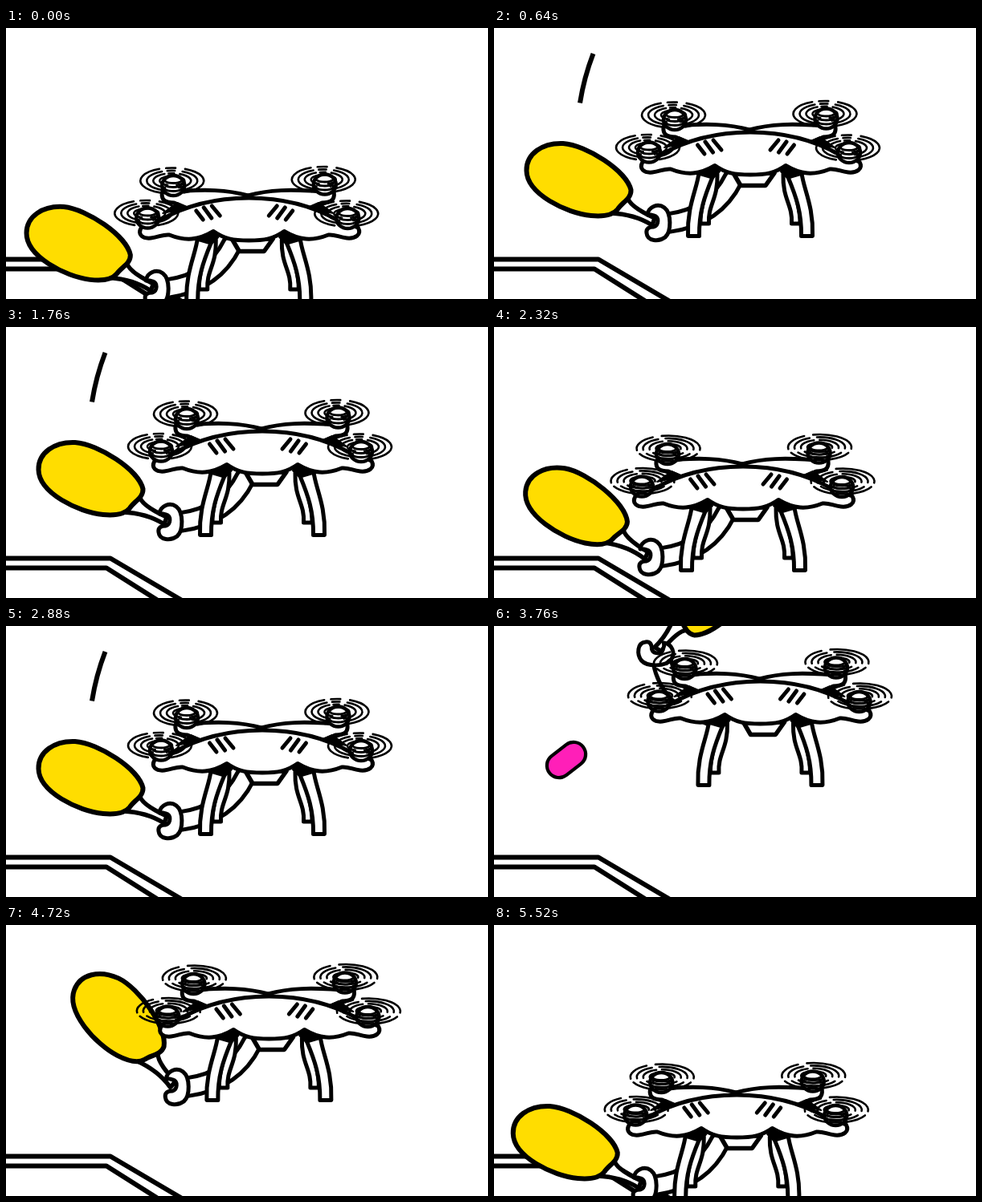
An HTML page with a canvas for the animation above (5600 ms loop, 600 px wide and 338 px high).

```html
<!DOCTYPE html>
<html lang="en">
<head>
<meta charset="utf-8">
<style>
html, body { margin: 0; width: 100%; height: 100%; overflow: hidden; background: #fff; }
canvas { display: block; }
</style>
</head>
<body>
<canvas id="stage" width="600" height="338"></canvas>
<script>
const ctx = document.getElementById('stage').getContext('2d');
const STEP = 80, STEPS = 14;
const YELLOW = '#ffdd00', PINK = '#ff1fb8';

// One pose per step of the swing
const LIFT = [0, 38, 95, 123, 138, 143, 155, 167, 82, 46, 17, 5, 0, 0];
const ANGLE = [1.5, 6, 14, 22, 68, 104, 115, 78, 0, 0, 0, 0, 0, 0];
const RAISE = [0, 0, 0, 0, .5, 1, 1.05, .9, 0, 0, 0, 0, 0, 0];
const BALL = { 4: [-2, 240], 5: [90, 167], 6: [158, 115], 7: [192, 85] };

const shape = d => new Path2D(d);
const TABLE = shape('M-5 288.5H130L219 341M-5 300.5H125L189 341');
const SWOOSH = shape('M123.5 32Q112 62 107 93.5');
const BLADE = shape('M40.5 178C40 157 60 143 86 144C115 146 165 178 170.5 202C171 213 160 217 154 226C147 235 132 235 121 234C90 231 41 207 40.5 178Z');
const HANDLE = shape('M166 210Q167 222 200 237L197 246Q175 232 145 231');
const FIST = shape('M191 233C192 223 204 218 212 224C221 231 221 254 213 261C205 267 191 266 190 256C189 250 193 248 199 248C205 246 206 236 199 234Q195 232 191 233Z');
const BACK_LEG = shape('M262 185C268 205 256 220 257 244H267.5C266 220 279 214 278 182Z');
const FRONT_LEG = shape('M255 181C253 200 240 222 241.5 259.5H255.5C255 230 262 210 272 186Z');
const HIP = shape('M257 180L275 171L281 179L272 188L266 182Z');
const BACK_ARM = shape('M318 127C290 119 262 120 240 121L211 123C210 132 214 136 226 136L244 144');
const WEDGE = shape('M212 149L230 136L244 142Z');
const BODY = shape('M319 130C284 130 246 136 208 158L185 167C180 176 187 181 197 180C207 179 212 175 220 176C240 184 256 183 275 171.5C288 181 300 183 319 183' +
  'C338 183 350 181 363 171.5C382 183 398 184 418 176C426 175 431 179 441 180C451 181 460 176 455 167L430 158C392 136 354 130 319 130Z');
const CAMERA = shape('M298 181L307 196.5H338L349 181Z');
const SLASHES = shape('M253.5 146L262 157M263 142L272.5 155M273 140L283 152');

function draw(path, width, fill) {
  if (fill) { ctx.fillStyle = fill; ctx.fill(path); }
  ctx.strokeStyle = '#000';
  ctx.lineWidth = width;
  ctx.stroke(path);
}

function mirrored(sum, paint) {
  paint();
  ctx.save();
  ctx.translate(sum, 0);
  ctx.scale(-1, 1);
  paint();
  ctx.restore();
}

function tube(path, outer, inner, color) {
  draw(path, outer);
  ctx.strokeStyle = color;
  ctx.lineWidth = inner;
  ctx.stroke(path);
}

function arc(x, y, rx, ry, from, to) {
  ctx.beginPath();
  ctx.ellipse(x, y, rx, ry, 0, from, to);
  ctx.stroke();
}

function rotor(x, y, odd) {
  const hub = new Path2D();
  hub.ellipse(x + 1.5, y + 6, 14, 12.5, 0, 0, Math.PI * 2);
  draw(hub, 4.5, '#fff');
  ctx.lineWidth = 2.8;
  for (let i = 0; i < 3; i++) arc(x + 1.5, y + i * 5 - 1, 11, 4, .2, 2.9);
  ctx.lineWidth = 2.6;
  for (let i = 0; i < 4; i++) {
    const rx = 39.5 - i * 8, ry = 16 - i * 3.4;
    if (odd) {
      const a = .45 + i * .12;
      arc(x + 2.5, y - 1, rx, ry, a, 2.7 - i * .1);
      arc(x + 2.5, y - 1, rx, ry, 3.0, 4.2 + i * .1);
      arc(x + 2.5, y - 1, rx, ry, 4.5 + i * .1, 6.4);
    } else {
      arc(x, y, rx, ry, 1.95, 4.3);
      arc(x, y, rx, ry, -1.15, 1.2);
      arc(x, y, rx, ry, 4.52, 4.82);
    }
  }
}

function racketArm(angle, raise) {
  const mix = (a, b) => a + (b - a) * raise;
  const hx = mix(203, 189), hy = mix(243, 94);
  const arm = new Path2D();
  arm.moveTo(mix(298, 262), mix(188, 175));
  arm.quadraticCurveTo(mix(275, 205), mix(235, 150), hx + mix(15, 8), hy + mix(0, 12));
  tube(arm, 27.5, 17.5, '#fff');

  const turned = (degrees, paint) => {
    ctx.save();
    ctx.translate(hx, hy);
    ctx.rotate(degrees * Math.PI / 180);
    ctx.translate(-203, -243);
    paint();
    ctx.restore();
  };
  turned(angle, () => {
    draw(HANDLE, 5.5, '#fff');
    draw(BLADE, 6, YELLOW);
  });
  turned(raise * 90, () => draw(FIST, 5, '#fff'));
}

function drone(odd) {
  mirrored(638, () => {
    draw(BACK_LEG, 5, '#fff');
    draw(FRONT_LEG, 5, '#fff');
  });
  mirrored(636, () => {
    draw(BACK_ARM, 5, '#fff');
    draw(WEDGE, 2, '#000');
  });
  draw(CAMERA, 5.5, '#fff');
  draw(BODY, 5, '#fff');
  mirrored(638, () => draw(HIP, 2, '#000'));
  mirrored(627, () => draw(SLASHES, 5));
  for (const [x, y] of [[223.5, 108.5], [412, 107], [191.5, 149], [440.5, 149.5]]) rotor(x, y, odd);
}

function render(now) {
  const step = Math.floor(now / STEP) % STEPS;
  ctx.fillStyle = '#fff';
  ctx.fillRect(0, 0, 600, 338);
  ctx.lineJoin = 'round';
  ctx.lineCap = 'butt';
  draw(TABLE, 6);

  ctx.lineCap = 'round';
  if (BALL[step]) {
    const [x, y] = BALL[step];
    tube(shape(`M${x - 9} ${y + 7}L${x + 9} ${y - 7}`), 34.5, 26, PINK);
  }

  ctx.save();
  const lift = LIFT[step] - 82;
  ctx.translate(lift * .204, -lift);
  racketArm(ANGLE[step], RAISE[step]);
  drone(step % 2 === 1);
  ctx.restore();

  ctx.lineCap = 'butt';
  if (step === 8) draw(SWOOSH, 6);
}

let start;
function tick(now) {
  start ??= now;
  render(now - start);
  requestAnimationFrame(tick);
}
render(0);
requestAnimationFrame(tick);
</script>
</body>
</html>
```
